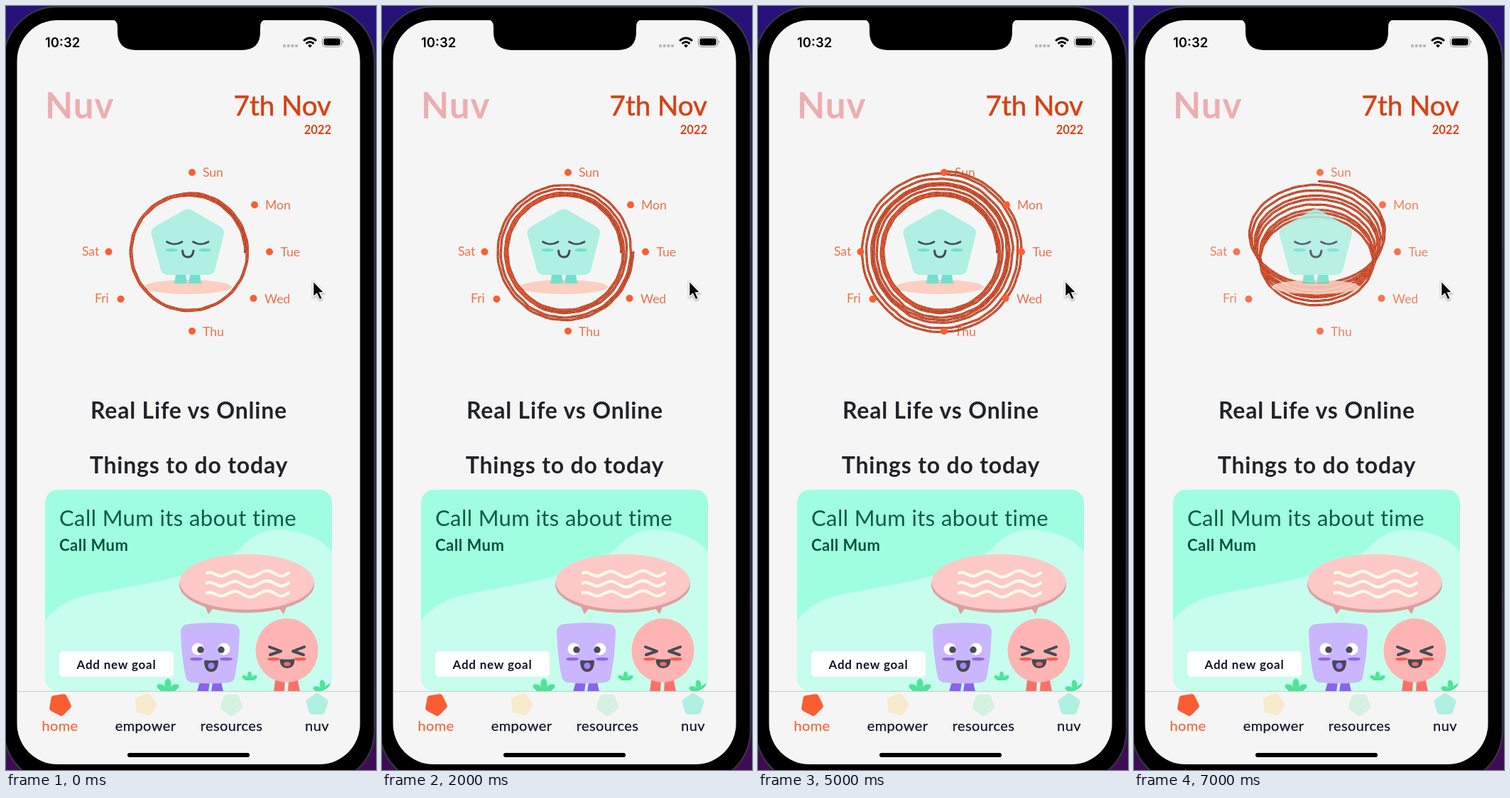
Animation, 521 px wide and 1074 px high, one loop 8 s. Source, as an HTML page:

```html
<!DOCTYPE html>
<html lang="en">
<head>
<meta charset="utf-8">
<title>Daily wellbeing coil</title>
<style>
  html, body { margin: 0; width: 100%; height: 100%; overflow: hidden; background: #24126a; }
  svg { display: block; width: 521px; height: 1074px; font-family: Lato, "Open Sans", sans-serif; }
  .bold { font-weight: 700; }
  .mid { text-anchor: middle; }
  .end { text-anchor: end; }
  .line { fill: none; stroke-linecap: round; stroke-linejoin: round; }
  .ink { stroke: #454b57; }
  .soft { stroke-linejoin: round; }
</style>
</head>
<body>
<svg viewBox="0 0 521 1074">
  <defs>
    <linearGradient id="desk" x2="0" y2="1">
      <stop offset="0" stop-color="#28117a"/>
      <stop offset=".6" stop-color="#1c0c4c"/>
      <stop offset="1" stop-color="#400b55"/>
    </linearGradient>
    <clipPath id="card"><rect x="55" y="680" width="404" height="283" rx="18"/></clipPath>
    <g id="grass" fill="#4fe39a">
      <ellipse cx="-9" cy="3" rx="7" ry="4" transform="rotate(25 -9 3)"/>
      <ellipse cx="9" cy="3" rx="7" ry="4" transform="rotate(-25 9 3)"/>
      <ellipse cy="-2" rx="4.5" ry="7.5"/>
      <rect x="-11" y="3" width="22" height="6" rx="3"/>
    </g>
    <path id="grin" d="M-8 -7Q0 -5.500 8 -7Q10 -7 10 -4Q9 9.500 0 9.500Q-9 9.500 -10 -4Q-10 -7 -8 -7Z" fill="#454b57"/>
    <path id="wave" class="line" stroke="#fffbe6" stroke-width="4.300"
      d="M283 0C291 -4 297 7 306 4S320 -6 330 0S344 8 353 3S367 -6 377 0S389 6 398 0"/>
  </defs>

  <rect width="521" height="1074" fill="url(#desk)"/>
  <rect x="-3" y="1" width="522" height="1092" rx="75" fill="#000" stroke="#35343c" stroke-width="2.500"/>
  <rect x="15.500" y="20" width="483" height="1046" rx="57" fill="#f5f5f5"/>
  <path d="M149 19Q157 20 157 29V36Q157 62 183 62H332Q358 62 358 36V29Q358 20 366 19Z"/>

  <!-- Status bar -->
  <text x="55" y="57.500" font-size="18.500" font-weight="600" style="font-family:Inter,sans-serif">10:32</text>
  <g fill="#b9b9bb">
    <circle cx="392" cy="56" r="2.200"/><circle cx="397.700" cy="56" r="2.200"/>
    <circle cx="403.300" cy="56" r="2.200"/><circle cx="409" cy="56" r="2.200"/>
  </g>
  <g class="line" stroke="#000" stroke-width="3" style="stroke-linecap:butt">
    <path d="M419 49Q428 41 437 49M422.500 53Q428 48 433.500 53"/>
    <path d="M425 55.500Q428 53 431 55.500L428 58.500Z" fill="#000" stroke="none"/>
  </g>
  <rect x="445.500" y="43.500" width="27" height="14" rx="4.500" fill="none" stroke="#96969a" stroke-width="1.200"/>
  <rect x="447.500" y="45.500" width="23" height="10" rx="2.700"/>
  <path d="M474 48Q476 50.500 474 53Z" fill="#888"/>

  <!-- Heading -->
  <text x="55" y="158" font-size="51" class="bold" fill="#edaeb0" letter-spacing="1">Nuv</text>
  <text x="458" y="153.500" font-size="38.500" class="end" fill="#d94016" stroke="#d94016" stroke-width=".6">7th Nov</text>
  <text x="458" y="180" font-size="16.500" class="bold end" fill="#dc421a">2022</text>

  <!-- Week dial -->
  <g id="days" font-size="17.500" fill="#ee6f49"></g>
  <g id="stage">
    <g id="buddy">
      <ellipse cx="256" cy="395" rx="62" ry="10" fill="#fbcfc1"/>
      <path d="M239 378H253L255 390H237ZM259 378H273L275 390H257Z" fill="#73dfca"/>
      <path class="soft" d="M256 295.500L297 319L284.500 368H227.500L214.500 319Z" fill="#aff0e2" stroke="#aff0e2" stroke-width="20"/>
      <g class="line ink" stroke-width="2.700">
        <path d="M226.500 331.500Q237 338 248 331.500M263.500 331.500Q274 338 285 331.500"/>
        <path d="M248.500 344Q249 353 256 353T264 344" stroke-width="3"/>
      </g>
      <g fill="#70e2cc"><ellipse cx="233" cy="343" rx="9" ry="2.300"/><ellipse cx="280" cy="343" rx="9" ry="2.300"/></g>
    </g>
    <g id="coil" class="line">
      <path stroke="#8d3a22" stroke-width="3.200"/>
      <path stroke="#ee5a33" stroke-width="2"/>
      <path stroke="#98402a" stroke-width=".8" stroke-dasharray="3 4 1 2"/>
    </g>
  </g>
  <g id="dots" fill="#fb5e34"></g>

  <!-- Headlines -->
  <g class="bold mid" font-size="32" fill="#222327" letter-spacing=".8">
    <text x="257.500" y="580">Real Life vs Online</text>
    <text x="257.500" y="657">Things to do today</text>
  </g>

  <!-- Goal card -->
  <g clip-path="url(#card)">
    <rect x="55" y="680" width="404" height="283" fill="#a0fee0"/>
    <path d="M55 863C70 846 88 834 115 828C160 818 200 814 245 801C290 792 312 779 336 756C355 738 375 734 400 738C428 742 446 751 459 767V963H55Z" fill="#c7fdec"/>
    <text x="75" y="731" font-size="31" fill="#0c5b45" letter-spacing=".4">Call Mum its about time</text>
    <text x="75" y="765.500" font-size="22" class="bold" fill="#0a513d" letter-spacing=".5">Call Mum</text>

    <g fill="#dca09e">
      <path d="M279 842L285 855L292 846ZM384 846L391 855L396 842Z"/>
      <ellipse cx="339" cy="813.500" rx="95" ry="39.500"/>
    </g>
    <ellipse cx="339" cy="809.500" rx="94.500" ry="39" fill="#fdc9c7"/>
    <use href="#wave" y="797"/><use href="#wave" y="811"/><use href="#wave" y="825"/>

    <use href="#grass" x="228" y="955"/>
    <use href="#grass" transform="translate(343 942) scale(.68)"/>
    <use href="#grass" transform="translate(446 956) rotate(-10) scale(.9)"/>

    <path d="M273 950H287L285 964H269ZM291 950H303L306 964H289Z" fill="#8963ef"/>
    <path d="M256 869Q288 865 320 869Q329 870 329 880Q328 915 322 943Q321 951 312 951Q288 954 263 951Q255 951 253 943Q247 915 246 880Q246 870 256 869Z" fill="#cab6fd"/>
    <g fill="#8c64f1"><ellipse cx="268" cy="918" rx="9" ry="2.300"/><ellipse cx="310" cy="918" rx="9" ry="2.300"/></g>
    <g fill="#fff"><circle cx="270" cy="904" r="8.500"/><circle cx="307" cy="904" r="8.500"/></g>
    <g fill="#454b57"><circle cx="274" cy="905" r="4.700"/><circle cx="303" cy="905" r="4.700"/></g>
    <use href="#grin" x="289" y="926.500"/>
    <ellipse cx="289" cy="927.500" rx="4.500" ry="4.500" fill="#a684fa"/>

    <path d="M379 948H393L392 964H377ZM398 948H411L414 964H397Z" fill="#fd7069"/>
    <ellipse cx="395.500" cy="906" rx="44" ry="45" fill="#feb4b2"/>
    <g fill="#f15e50"><ellipse cx="377" cy="918" rx="9" ry="2.300"/><ellipse cx="414" cy="918" rx="9" ry="2.300"/></g>
    <path class="line ink" stroke-width="4" d="M371 901L387 907L372 912M420 901L404 907L419 912"/>
    <use href="#grin" transform="translate(396 923.500) scale(1.050 .8)"/>
    <ellipse cx="396" cy="925" rx="4.700" ry="3" fill="#f06b61"/>
  </g>
  <rect x="75" y="907" width="161" height="36" rx="5" fill="#fff"/>
  <text x="155.500" y="932" font-size="17" class="bold mid" fill="#12132c" letter-spacing=".8">Add new goal</text>

  <!-- Tabs -->
  <path d="M16 963.500H498" stroke="#c9c9cb"/>
  <g id="tabs" font-size="20" class="mid" letter-spacing=".4"></g>
  <rect x="171" y="1050" width="172" height="6" rx="3"/>

  <path d="M432.500 386.500V409L437.500 404.500L441.500 413L445.500 411.200L441.700 403H448Z" stroke="#fff" stroke-width="1.500"
    style="filter:drop-shadow(0 1px 1px #0006)"/>
</svg>
<script>
const $ = id => document.getElementById(id);

const days = [
  ["Sun", 277, 240, 262, 234], ["Mon", 365, 286, 350, 279.5], ["Tue", 386.5, 352, 371, 345.5],
  ["Wed", 364, 418, 348.5, 411], ["Thu", 277, 463.5, 262, 457], ["Fri", 125, 417, 161.5, 412],
  ["Sat", 107, 351, 144.5, 345.5]
];
$("days").innerHTML = days.map(([name, x, y]) => `<text x="${x}" y="${y}">${name}</text>`).join("");
$("dots").innerHTML = days.map(([, , , x, y]) => `<circle cx="${x}" cy="${y}" r="5"/>`).join("");

const pentagon = turn => Array.from({ length: 5 }, (_, i) => {
  const a = (turn + i * 72) * Math.PI / 180;
  return `${(11.5 * Math.sin(a)).toFixed(1)},${(-11.5 * Math.cos(a)).toFixed(1)}`;
}).join(" ");

const tabs = [
  ["home", 76, "#fb5d33", 28, "#f9683f"], ["empower", 196.5, "#f8ebcb", 15, "#12132a"],
  ["resources", 317.5, "#d5f1e0", 35, "#12132a"], ["nuv", 438, "#aff0e3", 0, "#12132a"]
];
$("tabs").innerHTML = tabs.map(([name, x, color, turn, ink]) => `
  <polygon class="soft" points="${pentagon(turn)}" transform="translate(${x} 982)"
    fill="${color}" stroke="${color}" stroke-width="9"/>
  <text x="${x}" y="1019" fill="${ink}" stroke="${ink}" stroke-width=".25">${name}</text>`).join("");

// Each turn is made of arcs of constant radius, joined by short jogs.
const jogs = [0, .14, .25, .375, .65, .83];
const levels = Array.from({ length: 9 * jogs.length }, (_, i) => {
  const turn = Math.floor(i / jogs.length), part = jogs[i % jogs.length];
  return {
    at: turn + part + .012 * Math.sin(turn * 2.3 + i),
    r: 79 + 1.9 * (turn + part) ** 1.4 + 1.3 * Math.sin(i * 12.9)
  };
});

function radius(n) {
  let r = levels[0].r;
  for (const { at, r: next } of levels) {
    r += (next - r) * Math.min(1, Math.max(0, (n - at) / .014));
  }
  return r + .25 * Math.sin(n * 131);
}

// Turns wound, and tilt from flat (0) to bowl (1), per second.
const fullTurns = 8.25;
const poses = [
  [2.25, 0], [4, 0], [5, 0], [6.17, 0], [7.25, 0], [fullTurns, 0], [fullTurns, .09], [fullTurns, 1]
];

function coilPath(turns, tilt) {
  const points = [];
  for (let n = 0; n <= turns; n += 1 / 180) {
    const u = n / fullTurns, r = radius(n), a = n * 2 * Math.PI;
    const rx = r * (1 - .16 * u * tilt);
    const ry = r * (1 - (.2 + .18 * u) * tilt ** 1.5);
    const cy = 346 + (15 - 44 * u) * tilt;
    points.push(`${(257.5 + rx * Math.cos(a)).toFixed(1)} ${(cy - ry * Math.sin(a)).toFixed(1)}`);
  }
  return "M" + points.join("L");
}

let shown = -1;
function draw(step) {
  const [turns, tilt] = poses[step];
  const d = coilPath(turns, tilt);
  for (const path of $("coil").children) path.setAttribute("d", d);
  const bowl = tilt === 1;
  $("stage").append(bowl ? $("buddy") : $("coil"));
  for (const id of ["buddy", "dots", "days"]) $(id).setAttribute("opacity", bowl ? .86 : 1);
}

const start = performance.now();
function tick(now) {
  const step = Math.floor(Math.max(0, now - start) % 8000 / 1000);
  if (step !== shown) draw(shown = step);
  requestAnimationFrame(tick);
}
tick(start);
</script>
</body>
</html>
```
